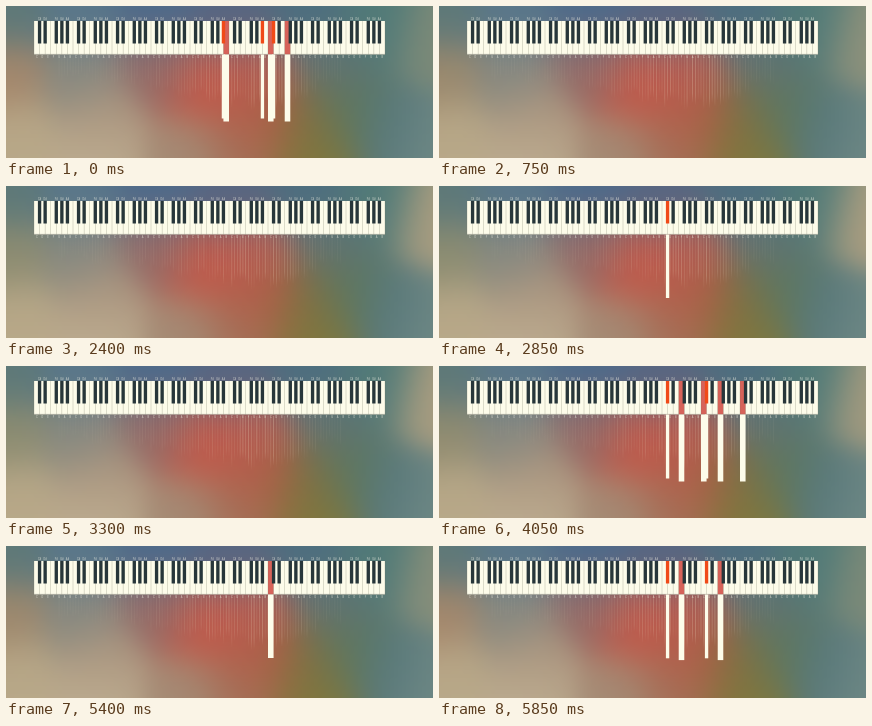
These frames come from a looping animation (427x152 px, 5.87 s). An HTML page with a canvas:

```html
<!DOCTYPE html>
<html lang="en">
<head>
<meta charset="utf-8">
<title>Piano visualiser</title>
<style>
  html, body { margin: 0; width: 100%; height: 100%; overflow: hidden; background: #5c7073; }
  canvas { display: block; width: 427px; height: 152px; }
</style>
</head>
<body>
<canvas id="stage" width="427" height="152"></canvas>
<script>
const ctx = document.getElementById('stage').getContext('2d');
const LOOP = 5870, STEP = 150, BEAT = 13;
const LEFT = 28, TOP = 15, WIDTH = 351, WHITES = 63, KEY = WIDTH / WHITES;
const WHITE_H = 33.5, BLACK_H = 22.5, BLACK_W = KEY * .6, BAR_TOP = TOP + WHITE_H;
const CREAM = '#fdfcea', INK = '#27363a';

// Mesh of colours: x, y, colour, and where it changes the colour at mid loop
const MESH = [
  [0, 8, '#5c7878'], [75, 8, '#58768a'], [150, 8, '#4a6a8c'], [225, 10, '#566682'],
  [300, 8, '#4c6e80'], [370, 25, '#4f7a78'], [427, 40, '#7d8a78', '#ac9e80'],
  [0, 70, '#a5866a', '#8c8c70'], [75, 70, '#858880'], [10, 130, '#b8a888'],
  [95, 112, '#ae9880'], [90, 152, '#bcac90'], [150, 62, '#946a66'], [200, 82, '#c45848'],
  [250, 72, '#b25c52'], [180, 148, '#a48a74'], [235, 142, '#a27058'], [255, 112, '#b85a46'],
  [300, 115, '#80703e'], [305, 150, '#80783c'], [340, 105, '#5a7860'], [325, 60, '#627272'],
  [385, 120, '#58787c'], [427, 135, '#6e8884']
].map(([x, y, from, to = from]) => ({ x, y, from: rgb(from), to: rgb(to) }));

// Whole keys are white; halves are the black key to their right.
const REFRAIN = [35.5, 38, 42.5, 45];
const CHORDS = [[33.5, 34, 40.5, 42, 42.5, 45], REFRAIN, [...REFRAIN, 42, 49], REFRAIN];
const SOLOS = { 6: [35.5], 10: [42] };

const isBlack = k => k % 1 !== 0;
const centre = k => LEFT + (k + .5) * KEY;
const noise = n => Math.abs(Math.sin(n * 127.1) * 4375.85) % 1;
const blackKeys = [];
for (let i = 0; i < WHITES; i++) {
  if (![2, 6].includes(i % 7)) blackKeys.push(i + .5);
}

function rgb(hex) {
  const n = parseInt(hex.slice(1), 16);
  return [n >> 16, n >> 8 & 255, n & 255];
}

function rect(x, y, w, h, fill) {
  ctx.fillStyle = fill;
  ctx.fillRect(x, y, w, h);
}

// Gaussian blend of the mesh, computed on a coarse grid and scaled up
const CELL = 4, SIGMA = 27;
const mesh = document.createElement('canvas');
mesh.width = Math.ceil(427 / CELL);
mesh.height = 152 / CELL;
const meshCtx = mesh.getContext('2d');

function drawBackground(drift) {
  const image = meshCtx.createImageData(mesh.width, mesh.height);
  const points = MESH.map(p => ({ ...p, mix: p.from.map((c, i) => c + (p.to[i] - c) * drift) }));
  for (let row = 0, at = 0; row < mesh.height; row++) {
    for (let col = 0; col < mesh.width; col++, at += 4) {
      let total = 0, sum = [0, 0, 0];
      for (const { x, y, mix } of points) {
        const dx = (col + .5) * CELL - x, dy = (row + .5) * CELL - y;
        const weight = Math.exp(-(dx * dx + dy * dy) / (2 * SIGMA * SIGMA));
        total += weight;
        sum = sum.map((s, i) => s + mix[i] * weight);
      }
      image.data.set([...sum.map(s => s / total), 255], at);
    }
  }
  meshCtx.putImageData(image, 0, 0);
  ctx.imageSmoothingQuality = 'high';
  ctx.drawImage(mesh, 0, 0, mesh.width * CELL, 152);
}

function drawStrings(phase) {
  for (let k = 4; k < 55; k += .5) {
    const x = centre(k);
    const env = Math.exp(-(((x - 265) / (x < 265 ? 120 : 48)) ** 2));
    const wave = .5 + .5 * Math.sin((noise(k) + phase) * Math.PI * 2);
    const length = 14 + 30 * env + 12 * noise(k + 99);
    const alpha = (.07 + .33 * env * env) * (.3 + .7 * wave);
    const g = ctx.createLinearGradient(0, 50, 0, 50 + length);
    g.addColorStop(0, `rgba(240,225,195,${alpha})`);
    g.addColorStop(.8, `rgba(240,225,195,${alpha * .8})`);
    g.addColorStop(1, 'rgba(240,225,195,0)');
    rect(x - .35, 50, .7, length, g);
  }
}

function drawLabels() {
  ctx.fillStyle = 'rgba(245,245,232,.75)';
  ctx.font = '2.6px Roboto, sans-serif';
  ctx.textAlign = 'center';
  for (const k of blackKeys) ctx.fillText('CDEFGAB'[Math.floor(k) % 7] + '#', centre(k), 13.6);
  for (let k = 0; k < WHITES; k++) ctx.fillText('CDEFGAB'[k % 7], centre(k), 52);
}

function drawKeys(active) {
  rect(LEFT, TOP, WIDTH, WHITE_H, CREAM);
  for (const k of active) {
    if (!isBlack(k)) rect(LEFT + k * KEY, TOP, KEY, WHITE_H, '#d66259');
  }
  for (let k = 0; k <= WHITES; k++) {
    rect(LEFT + k * KEY - .25, TOP, .5, WHITE_H, 'rgba(125,125,105,.5)');
  }
  rect(LEFT, TOP + WHITE_H - .6, WIDTH, .6, 'rgba(100,100,85,.45)');
  for (const k of blackKeys) {
    rect(centre(k) - BLACK_W / 2, TOP, BLACK_W, BLACK_H, active.includes(k) ? '#f04a18' : INK);
  }
}

// Fuller chords push the bars a little further down.
function drawBars(active) {
  for (const k of active) {
    const w = isBlack(k) ? BLACK_W : KEY;
    const end = 112 + (active.length - 1) * (isBlack(k) ? .1 : .7);
    rect(centre(k) - w / 2, BAR_TOP, w, end - BAR_TOP, CREAM);
  }
}

// A chord on each beat, then single notes before the next one
function notesAt(step) {
  const slot = step % BEAT;
  return slot < 2 ? CHORDS[Math.floor(step / BEAT)] : SOLOS[slot] || [];
}

function draw(step) {
  const phase = step * STEP / LOOP;
  const active = notesAt(step);
  drawBackground(Math.sin(Math.PI * phase));
  drawStrings(phase);
  drawLabels();
  drawKeys(active);
  drawBars(active);
}

let last = -1;
function tick() {
  const step = Math.floor(performance.now() % LOOP / STEP);
  if (step !== last) draw(last = step);
  requestAnimationFrame(tick);
}
tick();
</script>
</body>
</html>
```
